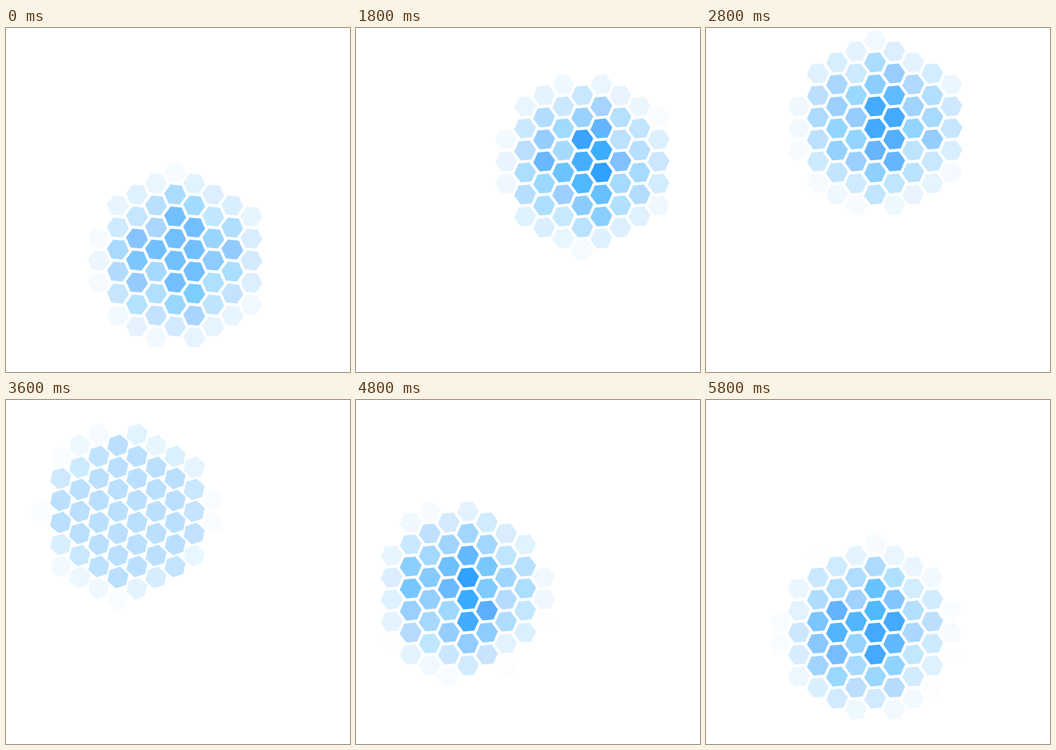
Animation, 500 px wide and 500 px high, one loop 5900 ms. Source, as an HTML page with a canvas:

```html
<!DOCTYPE html>
<html lang="en">
<head>
<meta charset="utf-8">
<title>Hexagon glow</title>
<style>
  html, body { margin: 0; width: 100%; height: 100%; overflow: hidden; background: #fff; }
  canvas { display: block; width: 500px; height: 500px; }
</style>
</head>
<body>
<canvas id="stage" width="500" height="500"></canvas>
<script>
const ctx = document.getElementById('stage').getContext('2d');
const TAU = Math.PI * 2;
const LOOP = 5900, STEP = 100;
const RADIUS = 16, PITCH = 32, COL = PITCH * Math.sqrt(3) / 2;
const GRID = { x: 245.8, y: 242 };
const ORBIT = { x: 243, y: 237, r: 98, period: 6, phase: TAU / 60 };
const REACH = 130;
const PULSE = { period: 3, dip: .47, base: .12, slope: .92, min: .265, max: .81 };

let seed = 11;
function random() {
  seed = (seed * 16807) % 2147483647;
  return seed / 2147483647;
}

// Columns alternate between brighter and paler, with some scatter per cell
function makeCells() {
  const cells = [];
  for (let i = -7; i <= 7; i++) {
    const column = 1 - .25 * Math.cos(TAU * (i + 1.1) / 3.2);
    for (let j = -15; j <= 15; j++) {
      if ((i + j) % 2) continue;
      cells.push({
        x: GRID.x + i * COL,
        y: GRID.y + j * PITCH / 2,
        gain: column + (random() - .5) * .45,
        green: Math.round(130 + random() * 28)
      });
    }
  }
  return cells;
}

// Opacity limit: falls and rises linearly around each dip
function ceiling(sec) {
  const { period, dip, base, slope, min, max } = PULSE;
  const gap = Math.abs(sec % period - dip);
  const value = base + slope * Math.min(gap, period - gap);
  return Math.min(max, Math.max(min, value));
}

function hexagon(x, y, turn) {
  ctx.beginPath();
  for (let k = 0; k < 6; k++) {
    const a = turn + k * TAU / 6;
    ctx.lineTo(x + RADIUS * Math.cos(a), y + RADIUS * Math.sin(a));
  }
  ctx.closePath();
  ctx.fill();
}

const cells = makeCells();

function draw(sec) {
  const angle = TAU * sec / ORBIT.period + ORBIT.phase;
  const cx = ORBIT.x + ORBIT.r * Math.sin(angle);
  const cy = ORBIT.y + ORBIT.r * Math.cos(angle);
  const cap = ceiling(sec);
  ctx.clearRect(0, 0, 500, 500);
  for (const { x, y, gain, green } of cells) {
    const fall = 1 - Math.hypot(x - cx, y - cy) / REACH;
    if (fall <= 0) continue;
    const glow = .85 * fall * gain;
    const tint = glow >= cap ? 140 : green;
    ctx.fillStyle = `rgba(0, ${tint}, 255, ${Math.min(cap, glow)})`;
    hexagon(x, y, angle);
  }
}

const start = performance.now();
function tick() {
  const ms = (performance.now() - start) % LOOP;
  draw(Math.floor(ms / STEP) * STEP / 1000);
  requestAnimationFrame(tick);
}
tick();
</script>
</body>
</html>
```
